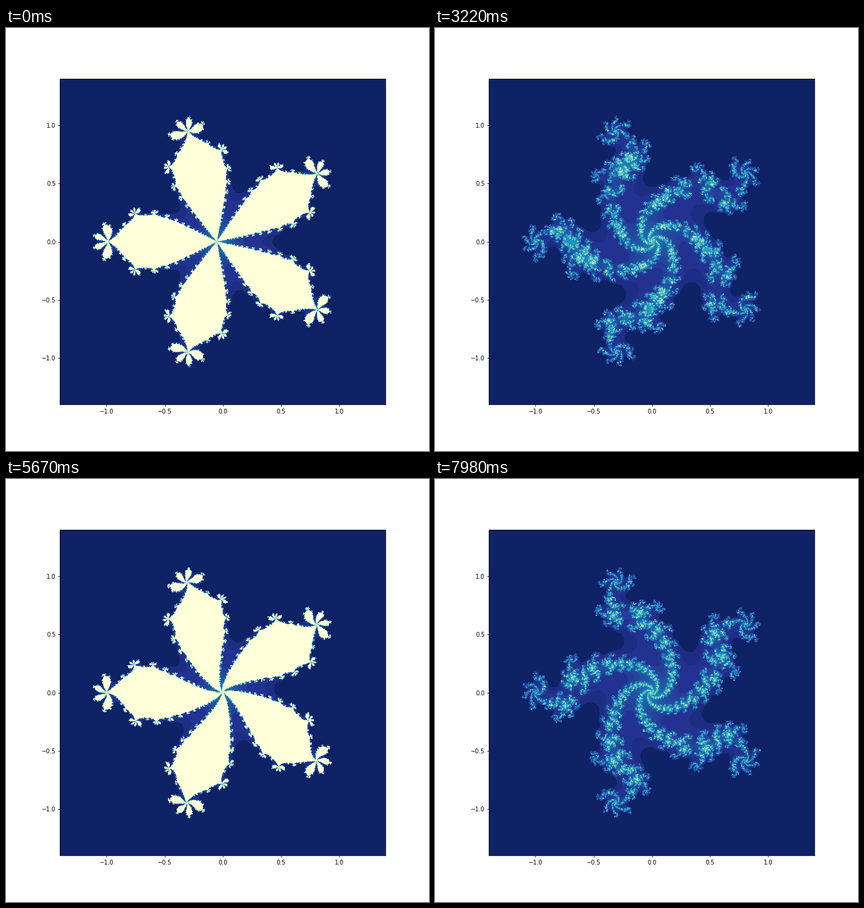
A matplotlib script for the animation above (8000 ms loop, 700 px wide and 700 px high).

```python
import numpy as np
import matplotlib.pyplot as plt
from matplotlib.animation import FuncAnimation
from matplotlib.colors import ListedColormap

LOOP_MS = 8000
FRAMES = 115
TURN = 200          # frames for one full turn of the parameter
LIMIT = 1.4
SIZE = 500
CAP = 50            # iteration limit
RADIUS = 2.0

axis = np.linspace(-LIMIT, LIMIT, SIZE)
inner = np.flatnonzero(np.abs(axis) < 1.16)
lo, hi = inner[0], inner[-1] + 1
near = axis[lo:hi]
START = (near[None, :] + 1j * near[:, None]).astype(np.complex64).ravel()


def palette():
    """Blue ramp in which the lowest counts share a few flat tones."""
    tone = np.linspace(0, CAP, 256)
    flat = np.select([tone < 3.5, tone < 4.5, tone < 7.5], [1.4, 4.6, 6.0], tone)
    return ListedColormap(plt.get_cmap("YlGnBu_r")(flat / CAP))


def escape_counts(frame):
    """Escape times of z -> a (z + z^6) + b."""
    turn = np.exp(2j * np.pi * frame / TURN)
    a = np.complex64(1.2 * turn)
    b = np.complex64(0.01 / turn)
    counts = np.full(START.size, CAP, dtype=np.float32)
    alive = np.arange(START.size)
    z = START
    for n in range(CAP):
        z2 = z * z
        z = a * (z + z2 * z2 * z2) + b
        out = z.real ** 2 + z.imag ** 2 > RADIUS ** 2
        if out.any():
            counts[alive[out]] = n
            keep = ~out
            alive, z = alive[keep], z[keep]
        if not alive.size:
            break
    return counts.reshape(near.size, near.size)


def picture(frame):
    grid = np.zeros((SIZE, SIZE), dtype=np.float32)
    grid[lo:hi, lo:hi] = escape_counts(frame)
    return grid


fig, ax = plt.subplots(figsize=(10, 10), dpi=70)
image = ax.imshow(picture(0), cmap=palette(), vmin=0, vmax=CAP,
                  extent=(-LIMIT, LIMIT, -LIMIT, LIMIT))


def update(frame):
    image.set_data(picture(frame))
    return (image,)


anim = FuncAnimation(fig, update, frames=FRAMES, interval=LOOP_MS / FRAMES,
                     init_func=lambda: update(0), repeat=True, repeat_delay=0)
plt.show()
```
